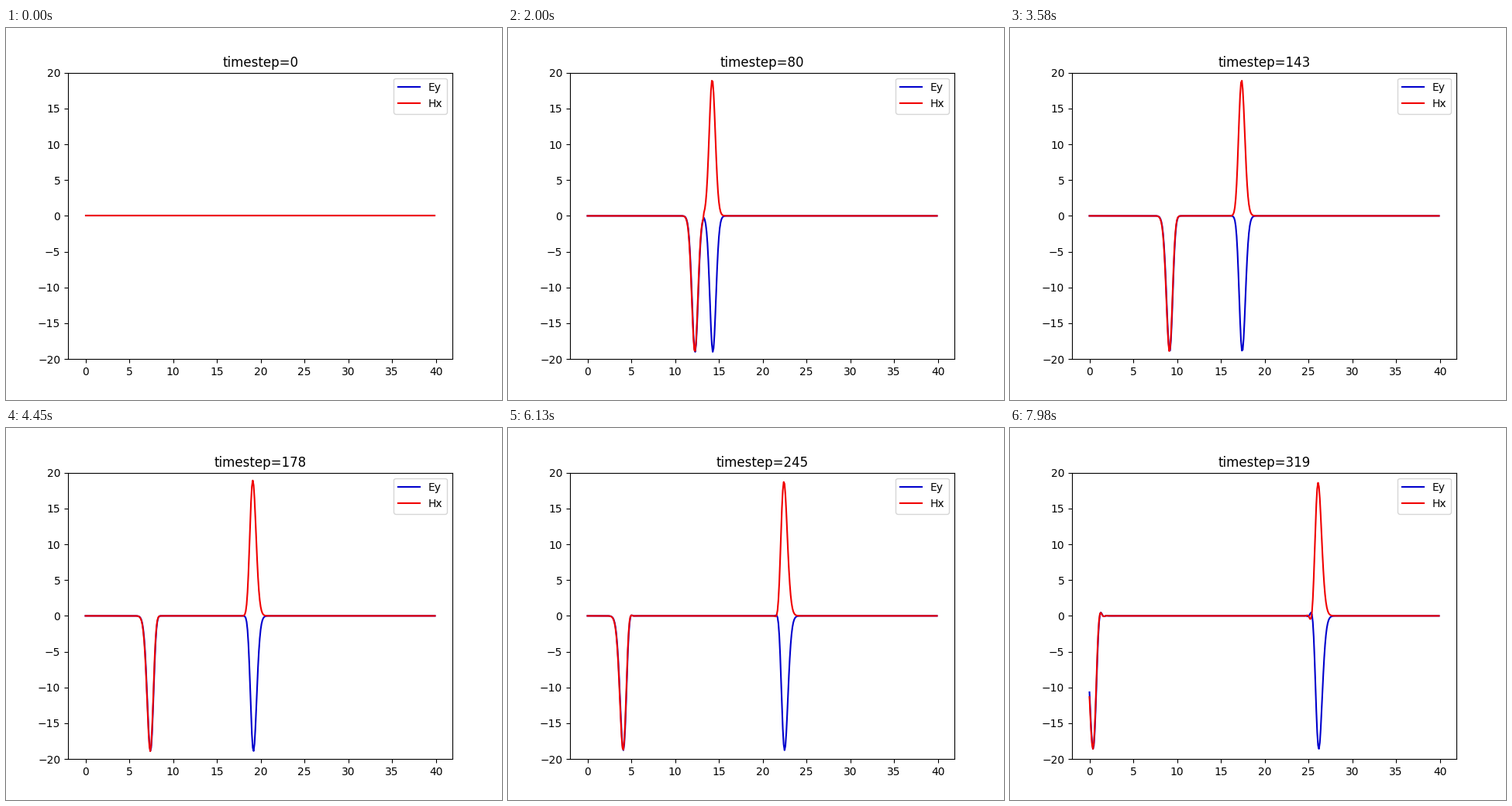
A matplotlib script for the animation above (8000 ms loop, 640 by 480 pixels).

```python
import numpy as np
import matplotlib.pyplot as plt
from matplotlib.animation import FuncAnimation

# 1D FDTD grid: Courant number 0.5, ten cells per wavelength
CELLS, STEPS = 400, 320
DZ, C0, EPS0 = 0.1, 3e8, 8.854e-12
COURANT = 0.5
DT = COURANT * DZ / C0
SOURCE = CELLS // 3
TAU = 10 * DT
T0 = 6 * TAU


def simulate():
    """Return Ey and normalised Hx after every time step."""
    ey, hx = np.zeros(CELLS), np.zeros(CELLS)
    left, right = [0.0, 0.0], [0.0, 0.0]  # two-step delays absorb at the ends
    history = []
    for n in range(STEPS):
        right.append(ey[-1])
        hx += COURANT * (np.append(ey[1:], right.pop(0)) - ey)
        left.append(hx[0])
        ey += COURANT * (hx - np.insert(hx[:-1], 0, left.pop(0)))
        current = np.exp(-((n * DT - T0) / TAU) ** 2)
        ey[SOURCE] -= DT / EPS0 * current
        history.append((ey.copy(), hx.copy()))
    return history


fields = simulate()
z = np.arange(CELLS) * DZ

fig, ax = plt.subplots(figsize=(6.4, 4.8), dpi=100)
ey_line, = ax.plot(z, fields[0][0], color="mediumblue", label="Ey")
hx_line, = ax.plot(z, fields[0][1], color="#f00000", label="Hx")
ax.set_ylim(-20, 20)
ax.legend(loc="upper right")
title = ax.set_title("timestep=0", pad=5.28)


def draw(n):
    ey, hx = fields[n]
    ey_line.set_ydata(ey)
    hx_line.set_ydata(hx)
    title.set_text(f"timestep={n}")
    return ey_line, hx_line, title


anim = FuncAnimation(fig, draw, frames=STEPS, interval=25, repeat=True,
                     repeat_delay=0)
plt.show()
```
